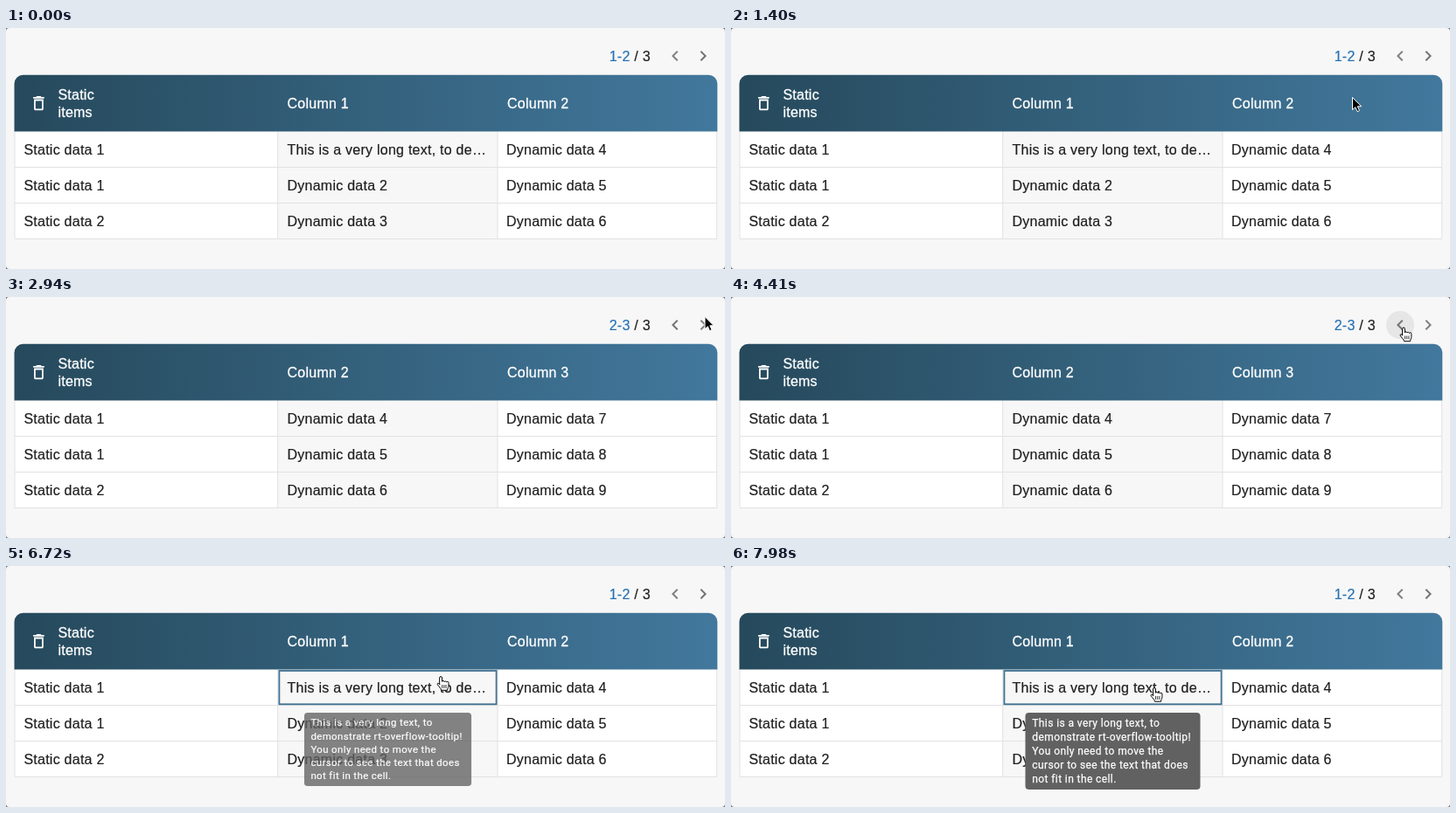
An HTML page for the animation above (8000 ms loop, 822x276 px).

```html
<!DOCTYPE html>
<html lang="en">
<head>
<meta charset="utf-8">
<title>Table with column paging</title>
<style>
  html, body { margin: 0; width: 100%; height: 100%; overflow: hidden; background: #777; }
  svg { display: block; }
  text {
    font: 16px "Liberation Sans", Arial, sans-serif; letter-spacing: .25px; white-space: pre;
    fill: #1f1f1f; stroke: #1f1f1f; stroke-width: .2px;
  }
  .head text { fill: #fff; stroke: #fff; stroke-width: .3px; }
  .range { fill: #2470b3; stroke: #2470b3; }
  .line { stroke: #e2e2e2; fill: none; }
  #tip text { font: 12px Roboto, sans-serif; letter-spacing: .4px; fill: #fff; stroke: #fff; stroke-width: .25px; }
</style>
</head>
<body>
<svg width="822" height="276" viewBox="0 0 822 276">
  <defs>
    <linearGradient id="blue">
      <stop offset="0" stop-color="#26495c"/>
      <stop offset=".5" stop-color="#34617c"/>
      <stop offset="1" stop-color="#42789d"/>
    </linearGradient>
  </defs>
  <rect width="822" height="276" rx="4" fill="#f7f7f7"/>

  <circle id="hover" r="16" cy="32" fill="#e6e6e6"/>
  <circle id="ripple" cy="32" fill="#000" fill-opacity=".07"/>
  <text x="689.7" y="38"><tspan class="range" id="range"></tspan> / 3</text>
  <path id="prev" transform="translate(753 20)" d="M15.41 7.41L14 6l-6 6 6 6 1.41-1.41L10.83 12z"/>
  <path id="next" transform="translate(785 20)" d="M10 6L8.59 7.41 13.17 12l-4.58 4.58L10 18l6-6z"/>

  <path fill="#fff" d="M10 118h301v123H10zM562 118h251v123H562z"/>
  <path class="line" d="M10 159.5H813M10 200.5H813M10 241.5H813M10 118V241M310.7 118V241M562 118V241M812.7 118V241"/>
  <g class="head">
    <path fill="url(#blue)" d="M9.5 118.4V63.7a10 10 0 0 1 10-10H803.3a10 10 0 0 1 10 10V118.4z"/>
    <path fill="#fff" transform="translate(26.6 75.3) scale(.9)" d="M16 9v10H8V9h8m-1.5-6h-5l-1 1H5v2h14V4h-3.5l-1-1zM18 7H6v12c0 1.1.9 2 2 2h8c1.1 0 2-.9 2-2V7z"/>
    <text x="59.4" y="81.7">Static</text>
    <text x="59.4" y="101.7">items</text>
    <text x="321.5" y="91.7" id="h0"></text>
    <text x="573" y="91.7" id="h1"></text>
  </g>
  <text x="20.4" y="144.8">Static data 1</text>
  <text x="20.4" y="185.8">Static data 1</text>
  <text x="20.4" y="226.8">Static data 2</text>
  <g id="cells"></g>

  <rect id="focus" x="312.4" y="120" width="248.2" height="38.3" fill="none" stroke="#3f7192" stroke-width="1.8"/>
  <g id="tip">
    <rect x="336.5" y="168" width="200" height="88" rx="4" fill="#616161"/>
  </g>

  <g id="cursor">
    <path id="arrow" fill="#000" stroke="#fff" stroke-linejoin="round"
      d="M0 0V14.2L3.3 11.2 5.5 16.2 8 15.1 5.8 10.3H10.2z"/>
    <g id="hand" transform="translate(0 1) scale(.9)" fill="#fff" stroke="#000" stroke-width="1.1" stroke-linejoin="round" stroke-linecap="round">
      <path d="M-1.6 10.3V2.2a1.6 1.6 0 0 1 3.2 0V7a1.5 1.5 0 0 1 2.9.3 1.5 1.5 0 0 1 2.8.6 1.4 1.4 0 0 1 2.6 1.1V12c0 2.6-1.4 3.2-1.5 6H.6c-.2-2.4-3.2-4.4-4.8-7.3-.8-1.7 1-2.4 2.6-.4z"/>
      <path stroke-width=".9" d="M1.8 11.5v3.5M4.2 11.5v3.5M6.6 11.5v3.5"/>
    </g>
  </g>
</svg>
<script>
const $ = id => document.getElementById(id);
const LOOP = 8000, STEP = 70;
const ENTER = 420, NEXT_CLICK = 2800, PREV_CLICK = 4970, TIP_AT = 6650;
const LONG = "This is a very long text, to de…";

// Cursor moves between rests
const origin = { x: 533, y: 229 };
const moves = [
  { from: 400, to: 840, x: 727, y: 101 },
  { from: 910, to: 1400, x: 710.5, y: 79.5 },
  { from: 1400, to: 1750, x: 798, y: 9 },
  { from: 1750, to: 2240, x: 799, y: 22.5 },
  { from: 3500, to: 4060, x: 774, y: 31 },
  { from: 4130, to: 4410, x: 769, y: 33.5 },
  { from: 5910, to: 6090, x: 773, y: 37 },
  { from: 6150, to: 6860, x: 466, y: 135 },
  { from: 6930, to: 7140, x: 462, y: 138 },
  { from: 7910, to: 7980, x: 484, y: 138 }
];

function svg(parent, tag, attrs, text = "") {
  const el = document.createElementNS("http://www.w3.org/2000/svg", tag);
  for (const k in attrs) el.setAttribute(k, attrs[k]);
  el.textContent = text;
  return parent.appendChild(el);
}

const cells = [];
for (let i = 0; i < 6; i++)
  cells.push(svg($("cells"), "text", { x: i < 3 ? 321.5 : 572, y: 144.8 + 41 * (i % 3) }));

["This is a very long text, to", "demonstrate rt-overflow-tooltip!", "You only need to move the",
 "cursor to see the text that does", "not fit in the cell."]
  .forEach((s, i) => svg($("tip"), "text", { x: 344.3, y: 184 + 16 * i }, s));

const clamp = v => Math.min(1, Math.max(0, v));
const ease = k => k * k * (3 - 2 * k);

function place(t) {
  let { x, y } = origin;
  for (const m of moves) {
    const k = ease(clamp((t - m.from) / (m.to - m.from)));
    x += (m.x - x) * k;
    y += (m.y - y) * k;
  }
  return [x, y];
}

const show = (id, on) => $(id).style.display = on ? "" : "none";

let shown = -1;
function setPage(page) {
  if (page === shown) return;
  shown = page;
  $("range").textContent = `${page + 1}-${page + 2}`;
  $("h0").textContent = `Column ${page + 1}`;
  $("h1").textContent = `Column ${page + 2}`;
  cells.forEach((c, i) => {
    const n = page * 3 + i + 1;
    c.textContent = n === 1 ? LONG : `Dynamic data ${n}`;
  });
  $("prev").setAttribute("fill", page ? "#747474" : "#808080");
  $("next").setAttribute("fill", page ? "#808080" : "#747474");
}

function draw(t) {
  const page = t >= NEXT_CLICK && t < PREV_CLICK ? 1 : 0;
  setPage(page);

  const [x, y] = place(t);
  const active = page ? 765 : 797;
  const onButton = Math.hypot(x - active, y - 32) < 16;
  const onCell = t > PREV_CLICK && x > 311 && x < 561 && y > 118 && y < 160;

  show("cursor", t >= ENTER);
  $("cursor").setAttribute("transform", `translate(${x} ${y})`);
  show("hand", onButton || onCell);
  show("arrow", !(onButton || onCell));
  show("hover", onButton);
  $("hover").setAttribute("cx", active);
  show("focus", onCell);

  const back = t >= PREV_CLICK;
  const age = t - (back ? PREV_CLICK : NEXT_CLICK);
  show("ripple", age >= 0 && age < 2 * STEP);
  $("ripple").setAttribute("cx", back ? 765 : 797);
  $("ripple").setAttribute("r", age < STEP ? 24 : 30);

  const p = clamp((t - TIP_AT) / 90), s = .8 + .2 * p;
  show("tip", p > 0);
  $("tip").setAttribute("opacity", p);
  $("tip").setAttribute("transform", `translate(436.5 168) scale(${s}) translate(-436.5 -168)`);
}

const start = performance.now();
function tick() {
  const t = (performance.now() - start) % LOOP;
  draw(Math.floor(t / STEP) * STEP);
  requestAnimationFrame(tick);
}
tick();
</script>
</body>
</html>
```
